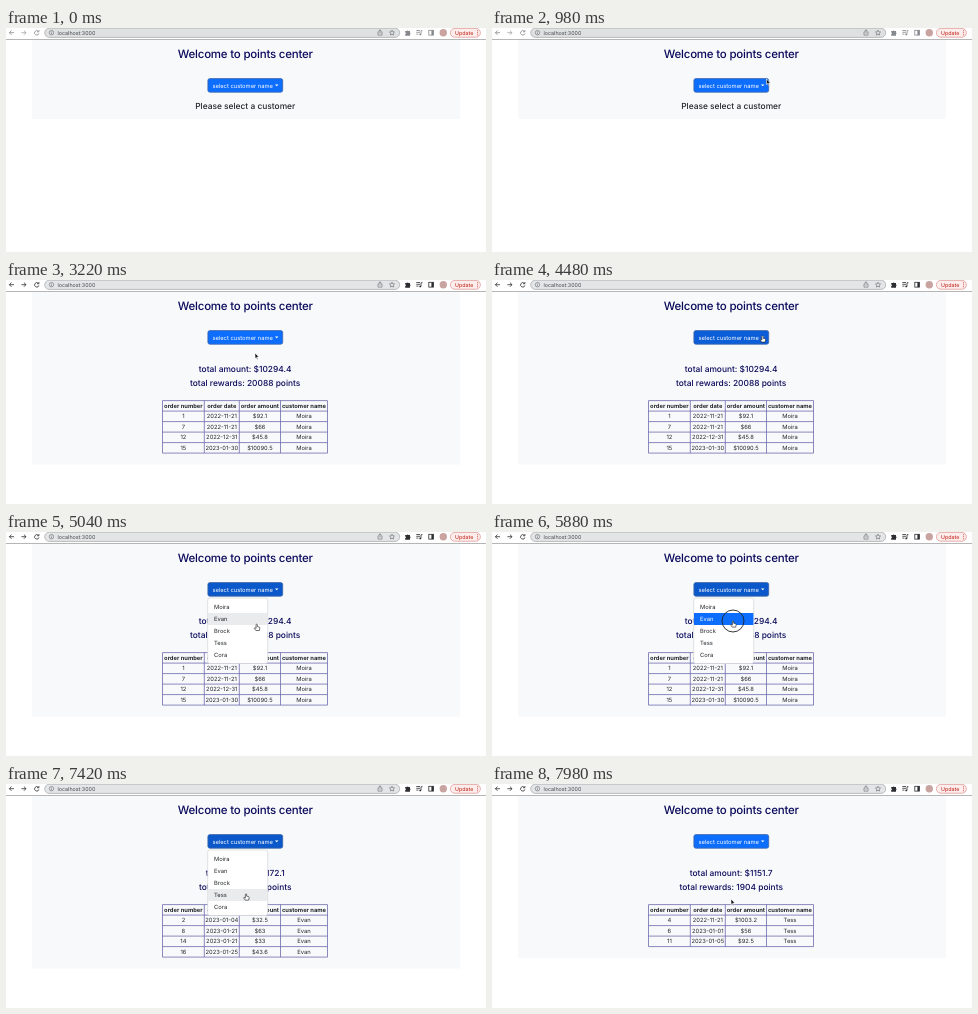
These frames come from a looping animation (480 px wide and 224 px high, 8000 ms). An HTML page:

```html
<!DOCTYPE html>
<html>
<head>
<meta charset="utf-8">
<style>
  html, body { margin: 0; width: 100%; height: 100%; overflow: hidden; background: #fff; }
  svg { display: block; width: 480px; height: 224px; font: 5.8px Inter, "Open Sans", sans-serif; text-rendering: geometricPrecision; }
</style>
</head>
<body>
<svg id="stage" viewBox="0 0 480 224"></svg>
<script>
const stage = document.getElementById('stage');
const LOOP = 8000;
const NAVY = '#0a0a5c', INK = '#212529', BLUE = '#0d6efd';
const names = ['Moira', 'Evan', 'Brock', 'Tess', 'Cora'];
const columns = [156.5, 198.3, 233.3, 274.5, 321.5];
const headings = ['order number', 'order date', 'order amount', 'customer name'];
const customers = {
  0: { amount: '$10294.4', points: 20088, orders: ['1 2022-11-21 $92.1', '7 2022-11-21 $66', '12 2022-12-31 $45.8', '15 2023-01-30 $10090.5'] },
  1: { amount: '$172.1', points: 13, orders: ['2 2023-01-04 $32.5', '8 2023-01-21 $63', '14 2023-01-21 $33', '16 2023-01-25 $43.6'] },
  3: { amount: '$1151.7', points: 1904, orders: ['4 2022-11-21 $1003.2', '6 2023-01-01 $56', '11 2023-01-05 $92.5'] }
};

// Pointer path: time, x, y
const path = [
  [280, 250, 209], [490, 243, 108], [630, 250, 98], [900, 274.5, 51], [1050, 274.5, 51],
  [1200, 270, 57], [1650, 270, 57], [2200, 249, 73], [3780, 249, 73], [4130, 270.5, 56],
  [4760, 270.5, 56], [5150, 246, 101], [5530, 241, 96], [5600, 241, 89], [6100, 241, 89],
  [6480, 270, 57], [6850, 270, 57], [7330, 240, 110], [7640, 240, 110], [7800, 239, 115]
];
const clicks = [1200, 1500, 2520, 4500, 5820, 6660, 7480];
const menus = [[1570, 2660], [4560, 5950], [6740, 7620]];
const picks = [[2660, 0], [5950, 1], [7620, 3]];

const rect = (x, y, w, h, fill, more = '') =>
  `<rect x="${x}" y="${y}" width="${w}" height="${h}" fill="${fill}" ${more}/>`;
const text = (s, x, y, fill = INK, more = '') => `<text x="${x}" y="${y}" fill="${fill}" ${more}>${s}</text>`;
const centered = (s, x, y, fill, more = '') => text(s, x, y, fill, `text-anchor="middle" ${more}`);
const heading = (s, y, fill) => centered(s, 239.2, y, fill, 'font-size="8.4" font-weight="500"');
const circle = (x, y, r, more) => `<circle cx="${x}" cy="${y}" r="${r}" ${more}/>`;
const line = (d, color, width = .7) => `<path d="${d}" fill="none" stroke="${color}" stroke-width="${width}"/>`;

function pointerAt(t) {
  if (t < path[0][0]) return null;
  const i = path.findIndex(p => p[0] > t);
  if (i < 0) return path[path.length - 1].slice(1);
  const [a, b] = [path[i - 1], path[i]];
  const u = (t - a[0]) / (b[0] - a[0]), k = u * u * (3 - 2 * u);
  return [a[1] + (b[1] - a[1]) * k, a[2] + (b[2] - a[2]) * k];
}

function toolbar(active) {
  const c = active ? '#2c2e31' : '#85888c';
  const forward = active ? c : '#a0a3a6';
  return rect(0, 0, 480, 11, '#fff') +
    rect(38.7, .2, 355, 9.2, active ? '#e4e5e7' : '#dfe0e1', 'rx="4.6" stroke="#a3a5a8" stroke-width=".7"') +
    rect(0, 11, 480, .8, '#a4a4a6') +
    line('M8 4.7H3.4M5.5 2.6L3.4 4.7L5.5 6.8', c, .8) +
    line('M15.4 4.7H20M17.9 2.6L20 4.7L17.9 6.8', forward, .8) +
    line('M32.4 3.4A2.2 2.2 0 1 0 32.9 5.4M32.9 2V3.8H31.1', c, .8) +
    circle(45.5, 4.7, 2.2, `fill="none" stroke="#66696d" stroke-width=".6"`) +
    line('M45.5 4.3V6M45.5 3.2V3.7', '#66696d', .6) +
    text('localhost:3000', 51.5, 6.6, '#44474b', 'font-size="5.35"') +
    line('M373 3.8H372V7.1H376V3.8H375M374 5.6V1.8M372.8 3L374 1.8L375.2 3', '#66696d', .6) +
    line('M386 2.1L386.8 3.9L388.6 4L387.2 5.3L387.6 7.1L386 6.2L384.4 7.1L384.8 5.3L383.4 4L385.2 3.9Z', '#66696d', .6) +
    `<path d="M399.2 3H400.8A1 1 0 0 1 402.6 3H404V4.5A1 1 0 0 1 404 6.2V7.7H399.2V6.1A.8.8 0 0 0 399.2 4.5Z" fill="${c}"/>` +
    line('M410.3 2.5H414M410.3 4.3H414M410.3 6.1H412.4M415 6.5V2.7H416.5', c, .8) +
    circle(414.2, 6.4, .9, `fill="${c}"`) +
    rect(422.8, 2.3, 4.6, 4.8, 'none', `stroke="${c}" stroke-width=".8"`) + rect(425.4, 2.3, 2, 4.8, c) +
    circle(437.3, 4.7, 3.7, 'fill="#c9a3a0"') +
    rect(444.4, .4, 30, 8.8, '#fdeeed', 'rx="4.4" stroke="#dd8f8a" stroke-width=".7"') +
    text('Update', 449, 6.7, '#c5352b', 'font-size="5.3" font-weight="500"') +
    [2.7, 4.7, 6.7].map(y => circle(471.6, y, .55, 'fill="#c5352b"')).join('');
}

function button(open, hover) {
  const fill = open ? '#0a58ca' : hover ? '#0b5ed7' : BLUE;
  return rect(201.9, 50.6, 74.8, 13.6, fill, 'rx="2" stroke="#3f66a6" stroke-width=".8"') +
    text('select customer name', 206.4, 59.5, '#fff') +
    '<path d="M268.9 56.4H272.5L270.7 58.2Z" fill="#fff"/>';
}

function report(id) {
  const { amount, points, orders } = customers[id];
  const top = 120.6, step = 10.5, bottom = top + step * (orders.length + 1);
  const cell = (s, i, row, more) =>
    centered(s, (columns[i] + columns[i + 1]) / 2, top + step * row + 7.3, INK, more);
  let out = heading(`total amount: ${amount}`, 91.8, NAVY) +
    heading(`total rewards: ${points} points`, 106.4, NAVY);
  let grid = columns.map(x => `M${x} ${top}V${bottom}`).join('');
  for (let r = 0; r <= orders.length + 1; r++) grid += `M156.5 ${top + step * r}H321.5`;
  out += line(grid, '#6c6cae', .8);
  headings.forEach((h, i) => out += cell(h, i, 0, 'font-weight="700"'));
  orders.forEach((o, r) => [...o.split(' '), names[id]].forEach((s, i) => out += cell(s, i, r + 1)));
  return out;
}

function menu(hovered, pressed) {
  let out = rect(201.7, 66, 60, 65.5, '#fff', 'rx="2.2" stroke="#d0d1d3" stroke-width=".6"');
  names.forEach((name, i) => {
    const on = i === hovered, y = 69 + i * 12;
    if (on) out += rect(202, y, 59.4, 12, pressed ? BLUE : '#e9ebed');
    out += text(name, 208, y + 8.1, on && pressed ? '#fff' : INK);
  });
  return out;
}

function pointer(x, y, hand) {
  const shape = hand
    ? 'M-.7 .2Q0-.7.7.2V2.4L3 3Q3.6 3.2 3.5 4L3 6.8H-.9L-2.7 4.3Q-2.4 3.4-1.4 4L-.7 4.5Z'
    : 'M0 0V6.2L1.4 4.9L2.4 7.1L3.4 6.7L2.4 4.5H4.4Z';
  const paint = hand ? 'fill="#fff" stroke="#222"' : 'fill="#111" stroke="#fff"';
  return `<path transform="translate(${x} ${y}) scale(.9)" d="${shape}" ${paint} stroke-width=".7"/>`;
}

function draw(t) {
  const pos = pointerAt(t);
  const open = menus.some(([a, b]) => t >= a && t < b);
  const pick = picks.filter(p => t >= p[0]).pop();
  const click = clicks.find(c => t >= c && t < c + 260);
  const [x, y] = pos || [0, 0];
  const active = t >= 1200;
  const onButton = active && x > 201 && x < 277 && y > 50 && y < 64.5;
  const row = Math.floor((y - 69) / 12);
  const hovered = open && x > 202 && x < 262 && row >= 0 && row < 5 ? row : -1;
  const height = pick ? 120.1 + 10.5 * (customers[pick[1]].orders.length + 1) : 79;

  let out = rect(26, 12, 428, height, '#f8f9fa') + toolbar(active) +
    centered('Welcome to points center', 239.3, 29.5, NAVY, 'font-size="11.5" font-weight="500" letter-spacing="-.22"') +
    button(open, onButton);
  out += pick ? report(pick[1]) : heading('Please select a customer', 80.5, INK);
  if (open) out += menu(hovered, click !== undefined);
  if (pos) out += pointer(x, y, onButton || hovered >= 0);
  if (click !== undefined) {
    const p = (t - click) / 260;
    out += circle(x, y, 10.5 + 2 * p, `fill="none" stroke="#222" stroke-width=".9" opacity="${Math.min(1, 2 - 2 * p)}"`);
  }
  stage.innerHTML = out;
}

const start = performance.now();
function tick() {
  draw((performance.now() - start) % LOOP);
  requestAnimationFrame(tick);
}
tick();
</script>
</body>
</html>
```
